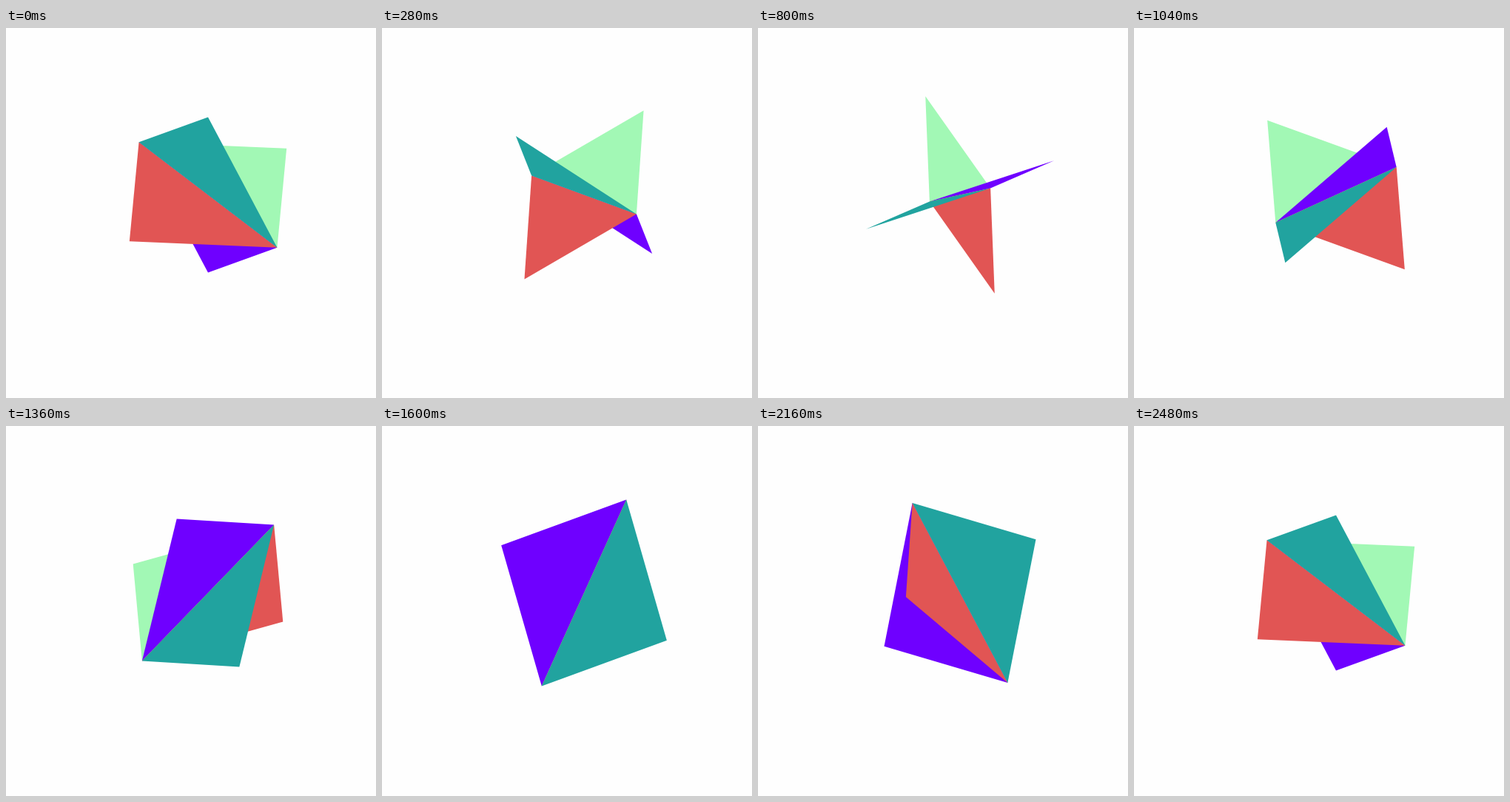
Recreate the animation shown at these times as an HTML page. Size 500 px wide and 500 px high, loop 2.56 s.

```html
<!DOCTYPE html>
<html lang="en">
<head>
<meta charset="utf-8">
<title>Crossed squares</title>
<style>
  html, body { margin: 0; width: 100%; height: 100%; overflow: hidden; background: #fefefe; }
  svg { display: block; width: 100%; height: 100%; }
</style>
</head>
<body>
<svg viewBox="0 0 500 500">
  <polygon id="green" fill="#a2f8b5"/>
  <polygon id="purple" fill="#6f00ff"/>
  <polygon id="red" fill="#e15554"/>
  <polygon id="teal" fill="#21a39f"/>
</svg>
<script>
const LOOP = 2560, STEP = 40, TURN = 62;
const CX = 273, CY = 225.5, RADIUS = 100 * Math.SQRT2;
const rad = deg => deg * Math.PI / 180;
const TILT = rad(42.1);   // spin axis against the screen
const LEAN = rad(41.35);  // shared diagonal against the spin axis

// Point on a circle around the tilted axis, projected straight onto the screen.
function project(along, out, angle) {
  return [
    RADIUS * out * Math.sin(angle),
    RADIUS * (out * Math.cos(angle) * Math.cos(TILT) - along * Math.sin(TILT))
  ];
}

function triangle(id, hinge, tip, side) {
  const points = [[hinge, 1], [hinge, -1], [tip, side]].map(([[x, y], s]) =>
    (CX + s * x).toFixed(2) + "," + (CY + s * y).toFixed(2));
  document.getElementById(id).setAttribute("points", points.join(" "));
}

function draw(ms) {
  const step = Math.min(TURN, Math.floor((ms % LOOP) / STEP));
  const angle = 2 * Math.PI * (step / TURN - 0.25);
  const hinge = project(Math.cos(LEAN), Math.sin(LEAN), angle);
  const a = project(0, 1, angle - Math.PI / 2);
  const b = project(-Math.sin(LEAN), Math.cos(LEAN), angle);
  triangle("green", hinge, b, -1);
  triangle("purple", hinge, a, -1);
  triangle("red", hinge, b, 1);
  triangle("teal", hinge, a, 1);
}

let start = null;
function tick(now) {
  if (start === null) start = now;
  draw(Math.max(0, now - start));
  requestAnimationFrame(tick);
}
draw(0);
requestAnimationFrame(tick);
</script>
</body>
</html>
```
